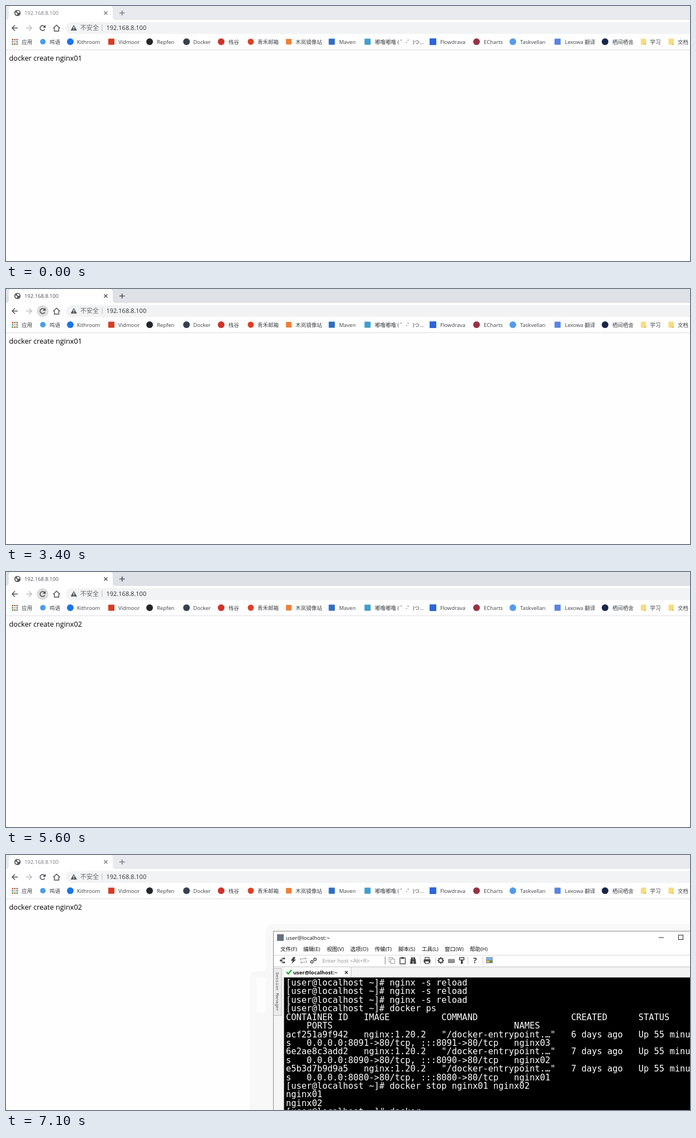
Animation, 1224 px wide and 457 px high, one loop 8 s. Source, as an HTML page with a canvas:

```html
<!DOCTYPE html>
<html lang="zh-CN">
<head>
<meta charset="utf-8">
<title>Load balancing</title>
<style>
html, body { margin: 0; width: 100%; height: 100%; overflow: hidden; background: #fefefe; }
canvas { display: block; }
</style>
</head>
<body>
<canvas id="stage" width="1224" height="457"></canvas>
<script>
const c = document.getElementById('stage').getContext('2d');
const LOOP = 8000;
const SANS = '"Open Sans", "Noto Sans CJK SC", "Noto Sans CJK", sans-serif';
const MONO = '"DejaVu Sans Mono", "Noto Sans Mono", monospace';
const INK = '#4b4f53';

// Page reloads: the spinner shows in these spans, the answer flips at these times.
const spins = [[2400, 2600], [2700, 2900], [3100, 3400], [3600, 3800],
  [3900, 4100], [4300, 4600], [5000, 5300]];
const flips = [2200, 2500, 2800, 3200, 3700, 4000, 4400, 4800, 5100, 5500, 5600];

// icon x, icon shape, icon size, colour, label x, label
const bookmarks = [
  [66, 'o', 10, '#4a9fe8', 78, '鸣语'],
  [115, 'o', 12, '#1b74e8', 127, 'Kithroom'],
  [188.5, 's', 11, '#dc3a22', 201, 'Vidmoor'],
  [257, 'o', 12, '#23272b', 270, 'Repfen'],
  [323, 'o', 12, '#36414f', 335, 'Docker'],
  [385, 'o', 12, '#d03228', 398, '栈谷'],
  [438, 'o', 11, '#dc4026', 450, '青禾邮箱'],
  [506, 's', 10, '#ee8038', 518, '木岚镜像站'],
  [583, 's', 11, '#2f6fc4', 596, 'Maven'],
  [647, 's', 11, '#3f9fce', 660, '嘟噜嘟噜 ( ゜-゜)つ...'],
  [764, 's', 12, '#2d66dc', 777, 'Flowdrava'],
  [842, 'o', 12, '#963244', 855, 'ECharts'],
  [907, 'o', 12, '#549ceb', 920, 'Taskvellan'],
  [987, 's', 11, '#5984e0', 1000, 'Lexowa 翻译'],
  [1072, 'o', 12, '#18264a', 1085, '栖间栖舍']
];

const menus = [[13, '文件(F)'], [54, '编辑(E)'], [96, '视图(V)'], [138, '选项(O)'],
  [182, '传输(T)'], [224, '脚本(S)'], [266, '工具(L)'], [307, '窗口(W)'], [352, '帮助(H)']];

const prompt = '[user@localhost ~]# ';
const container = (id, days, port, name) => [
  `${id}   nginx:1.20.2   "/docker-entrypoint.…"   ${days} days ago   Up 55 minute`,
  `s   0.0.0.0:${port}->80/tcp, :::${port}->80/tcp   ${name}`
];
const output = [
  ...Array(3).fill(prompt + 'nginx -s reload'),
  prompt + 'docker ps',
  'CONTAINER ID   IMAGE          COMMAND                  CREATED      STATUS',
  '    PORTS'.padEnd(44) + 'NAMES',
  ...container('acf251a9f942', 6, 8091, 'nginx03'),
  ...container('6e2ae8c3add2', 7, 8090, 'nginx02'),
  ...container('e5b3d7b9d9a5', 7, 8080, 'nginx01'),
  prompt + 'docker stop nginx01 nginx02',
  'nginx01',
  'nginx02',
  prompt + 'docker'
];

function text(s, x, y, size, color, family = SANS, weight = '') {
  c.font = `${weight} ${size}px ${family}`;
  c.fillStyle = color;
  c.fillText(s, x, y);
}
function rect(x, y, w, h, color) {
  c.fillStyle = color;
  c.fillRect(x, y, w, h);
}
function frame(x, y, w, h, color, width = 1) {
  c.strokeStyle = color;
  c.lineWidth = width;
  c.strokeRect(x, y, w, h);
}
function round(x, y, w, h, r, color) {
  c.beginPath();
  c.roundRect(x, y, w, h, r);
  c.fillStyle = color;
  c.fill();
}
function dot(x, y, r, color) {
  c.beginPath();
  c.arc(x, y, r, 0, 7);
  c.fillStyle = color;
  c.fill();
}
function ring(x, y, r, color, width = 1, from = 0, to = Math.PI * 2) {
  c.beginPath();
  c.arc(x, y, r, from, to);
  c.strokeStyle = color;
  c.lineWidth = width;
  c.stroke();
}
function trace(pts) {
  c.beginPath();
  for (let i = 0; i < pts.length; i += 2) c.lineTo(pts[i], pts[i + 1]);
}
function line(color, width, ...pts) {
  trace(pts);
  c.strokeStyle = color;
  c.lineWidth = width;
  c.stroke();
}
function poly(color, ...pts) {
  trace(pts);
  c.fillStyle = color;
  c.fill();
}
function cross(x, y, r, color, width) {
  line(color, width, x - r, y - r, x + r, y + r);
  line(color, width, x - r, y + r, x + r, y - r);
}

function globe() {
  dot(20.5, 12.5, 5.6, '#54585d');
  poly('#fff', 16.5, 11, 19, 12.5, 20.5, 14, 19.5, 16.5, 17, 14.5);
  poly('#fff', 20, 8.5, 23, 9, 24.5, 12, 22, 12.5, 19.5, 10.5);
}

function tabStrip(t, active) {
  const strip = active ? '#dee1e6' : '#e8eaed';
  const ink = active ? INK : '#777a7e';
  rect(0, 0, 1224, 25, strip);
  rect(0, 20, 196, 5, '#fff');
  round(-6, 0, 11, 25, [0, 0, 5, 0], strip);
  round(191, 0, 12, 25, [0, 0, 0, 5], strip);
  round(5, 0, 186, 25, [5, 5, 0, 0], '#fff');

  if (spins.some(([a, b]) => t >= a && t < b)) {
    const a = -t / 1000 * Math.PI * 2;
    ring(20.5, 12.5, 5, '#7d8288', 1.5, a, a + 3.6);
  } else globe();

  text('192.168.8.100', 33, 16, 9.4, ink);
  cross(178.5, 12.5, 3, ink, 1.4);
  line(ink, 1.5, 203, 12.5, 212.5, 12.5);
  line(ink, 1.5, 207.75, 8, 207.75, 17);
}

function arrow(x, dir, color) {
  line(color, 1.5, x - 5 * dir, 39.5, x + 5 * dir, 39.5);
  line(color, 1.5, x, 34.5, x - 5 * dir, 39.5, x, 44.5);
}

function toolbar(hover) {
  rect(0, 25, 1224, 53, '#fff');
  arrow(16, 1, INK);
  arrow(41, -1, '#bcbec1');
  if (hover) {
    c.globalAlpha = hover;
    dot(65.5, 39.5, 10.5, '#dcddde');
    c.globalAlpha = 1;
  }
  ring(65.5, 39.5, 4.5, INK, 1.5, 0.5, 5.6);
  poly(INK, 70.8, 34, 70.8, 39, 65.8, 39);
  line(INK, 1.4, 84.5, 40, 90.5, 34.2, 96.5, 40);
  line(INK, 1.4, 86.5, 39, 86.5, 45, 94.5, 45, 94.5, 39);

  round(107, 29, 1140, 21, 10.5, '#f1f3f4');
  poly('#54585c', 121.3, 34, 127, 44, 115.6, 44);
  rect(120.7, 37, 1.3, 3.6, '#fff');
  rect(120.7, 41.5, 1.3, 1.3, '#fff');
  text('不安全', 133, 43, 11, '#66696d');
  rect(171.5, 33, 1, 12, '#b8babd');
  text('192.168.8.100', 179.5, 43, 11, '#2b2e31');
}

function bookmarkBar() {
  const apps = ['#dc4a3a', '#e8b030', '#3f9a58', '#4880dc'];
  for (let i = 0; i < 9; i++)
    rect(10.5 + i % 3 * 4, 59 + (i / 3 | 0) * 4, 2.6, 2.6, apps[(i * 2 + (i / 3 | 0)) % 4]);
  text('应用', 28, 68, 9.5, '#3c4043');

  for (const [x, shape, size, color, tx, label] of bookmarks) {
    const r = size / 2;
    if (shape === 'o') dot(x, 64, r, color);
    else round(x - r, 64 - r, size, size, 1, color);
    text(label, tx, 68, 9.5, '#3c4043');
  }
  for (const [x, label] of [[1136, '学习'], [1185.5, '文档']]) {
    round(x, 58.5, 9.5, 11, 1, '#f7dc80');
    rect(x + 6, 67, 3.5, 2.5, '#e6c458');
    text(label, x + 16.5, 68, 9.5, '#3c4043');
  }
  rect(0, 78, 1224, 1, '#dcdee1');
}

function toolIcons() {
  const k = '#444', g = '#999';
  // tree, bolt, reconnect, link
  line(k, 1.2, 12, 53, 16, 53);
  line(k, 1.2, 20, 49, 16, 49, 16, 57, 20, 57);
  rect(12, 51.5, 3, 3, k);
  rect(18, 48, 3, 3, k);
  rect(18, 55, 3, 3, k);
  poly(k, 36, 47, 40, 47, 37.5, 51.5, 41, 51.5, 33, 59, 35, 53.5, 31.5, 53.5);
  line(g, 1.2, 48.5, 53, 48.5, 50, 59, 50, 57, 48);
  line(g, 1.2, 60, 53, 60, 56, 49.5, 56, 51.5, 58);
  ring(69.5, 55.5, 2.3, k, 1.4);
  ring(75, 51, 2.3, k, 1.4);
  // copy, paste, find
  frame(207.5, 47.5, 6, 8, g);
  rect(210, 50, 8, 9, '#fff');
  frame(210.5, 50.5, 7, 8, g);
  frame(227, 48.5, 9.5, 10.5, k, 1.4);
  rect(229, 47, 5, 3, k);
  poly(k, 245, 59, 246, 51, 248, 47, 250, 47, 250, 59);
  poly(k, 256, 59, 255, 51, 253, 47, 251, 47, 251, 59);
  rect(249, 51, 3, 3, k);
  // printer, gear, keyboard, pin
  frame(272, 47.5, 7, 4, k, 1.2);
  round(269.5, 51, 12, 6, 1, k);
  rect(272, 54, 7, 4, '#fff');
  frame(272, 54, 7, 4.5, k, 1.2);
  for (let i = 0; i < 8; i++) {
    const a = i * Math.PI / 4;
    dot(300 + 4.7 * Math.cos(a), 53 + 4.7 * Math.sin(a), 1.3, k);
  }
  ring(300, 53, 3.5, k, 1.7);
  round(313, 50.5, 12, 7, 1, '#777');
  for (let i = 0; i < 8; i++) rect(314.5 + i % 4 * 2.5, 52 + (i / 4 | 0) * 2.5, 1.3, 1, '#fff');
  frame(333.5, 48, 8, 4, k, 1.5);
  rect(336, 52, 3.5, 7, k);
  text('?', 358, 58, 14, k, SANS, 'bold');
  // picture
  rect(381, 47, 12, 11, '#8a9197');
  rect(382, 48, 10, 4, '#79b4dc');
  rect(382, 53, 5, 4, '#d8b04a');
  rect(388, 53, 4, 4, '#4c9b62');
}

function terminal(x, y, scale, alpha) {
  c.save();
  c.translate(x, y);
  c.scale(scale, scale);
  c.globalAlpha = alpha;
  rect(0, 0, 782, 420, '#fff');

  // title bar and menus
  rect(7, 6, 12, 12, '#65727e');
  text('user@localhost:~', 23, 15.5, 9.8, '#111');
  line('#222', 1, 690, 12, 699, 12);
  frame(725.5, 7.5, 8, 8, '#222');
  cross(763.5, 11.5, 4.2, '#222', 1);
  for (const [mx, label] of menus) text(label, mx, 36, 9.6, '#111');

  // toolbar
  rect(1, 43, 780, 1, '#d8d8d8');
  toolIcons();
  text('Enter host <Alt+R>', 88, 56.5, 9.8, '#909090');
  for (const sx of [200, 263, 290, 348, 375]) rect(sx, 46, 1, 14, sx === 200 ? '#777' : '#ccc');
  poly('#222', 774, 56, 778, 56, 776, 58.5);

  // session tabs
  rect(1, 64, 780, 20, '#f3f3f3');
  rect(1, 64, 780, 1, '#c4c4c4');
  rect(20, 65, 119, 19, '#fff');
  rect(139, 65, 1, 19, '#c4c4c4');
  line('#1fb52a', 2.6, 24, 73.5, 27, 77, 33, 70);
  text('user@localhost:~', 36, 77.5, 9.3, '#111', SANS, 'bold');
  cross(131, 74.5, 2.5, '#222', 1.3);
  poly('#888', 758, 70, 758, 77, 754.5, 73.5);
  poly('#888', 770, 70, 770, 77, 773.5, 73.5);

  // side panel
  rect(1, 65, 19, 355, '#f5f5f5');
  rect(1, 67, 14, 85, '#ececec');
  frame(0.5, 67.5, 14.5, 84, '#bcbcbc');
  c.save();
  c.translate(5, 74);
  c.rotate(Math.PI / 2);
  text('Session Manager', 0, 0, 7.8, '#555', '"Liberation Mono", monospace');
  c.restore();

  // screen and scroll bar
  rect(19, 83, 746, 337, '#777');
  rect(20, 84, 744, 336, '#000');
  rect(765, 84, 13, 336, '#f0f0f0');
  line('#666', 1.2, 768.5, 95.5, 771.5, 92.5, 774.5, 95.5);
  rect(765, 250, 13, 60, '#cdcdcd');
  c.save();
  c.beginPath();
  c.rect(20, 84, 744, 336);
  c.clip();
  output.forEach((s, i) => text(s, 23, 98 + i * 15.42, 15.42, '#fff', MONO));
  c.restore();

  frame(0.5, 0.5, 781, 420, '#8c8c8c');
  c.restore();
}

function draw(t) {
  const active = t >= 1000 && t < 6900;
  const hover = t < 1800 || t >= 6100 ? 0 : t < 1900 ? 0.5 : 1;
  const server = 1 + flips.filter(f => t >= f).length % 2;

  rect(0, 0, 1224, 457, '#fefefe');
  tabStrip(t, active);
  toolbar(hover);
  bookmarkBar();
  text('docker create nginx0' + server, 5.5, 98, 12.7, '#000');

  if (t >= 7000) round(436, 208, 751, 270, 12, '#f8f8f8');
  if (t >= 7100) {
    rect(448, 220, 20, 62, '#fdfdfd');
    round(465, 124, 790, 350, 12, '#f8f8f8');
    terminal(478, 136, 1, 1);
  } else if (t >= 7000) terminal(447, 219, 0.929, 0.66);
}

const start = performance.now();
function tick() {
  draw((performance.now() - start) % LOOP);
  requestAnimationFrame(tick);
}
tick();
</script>
</body>
</html>
```
